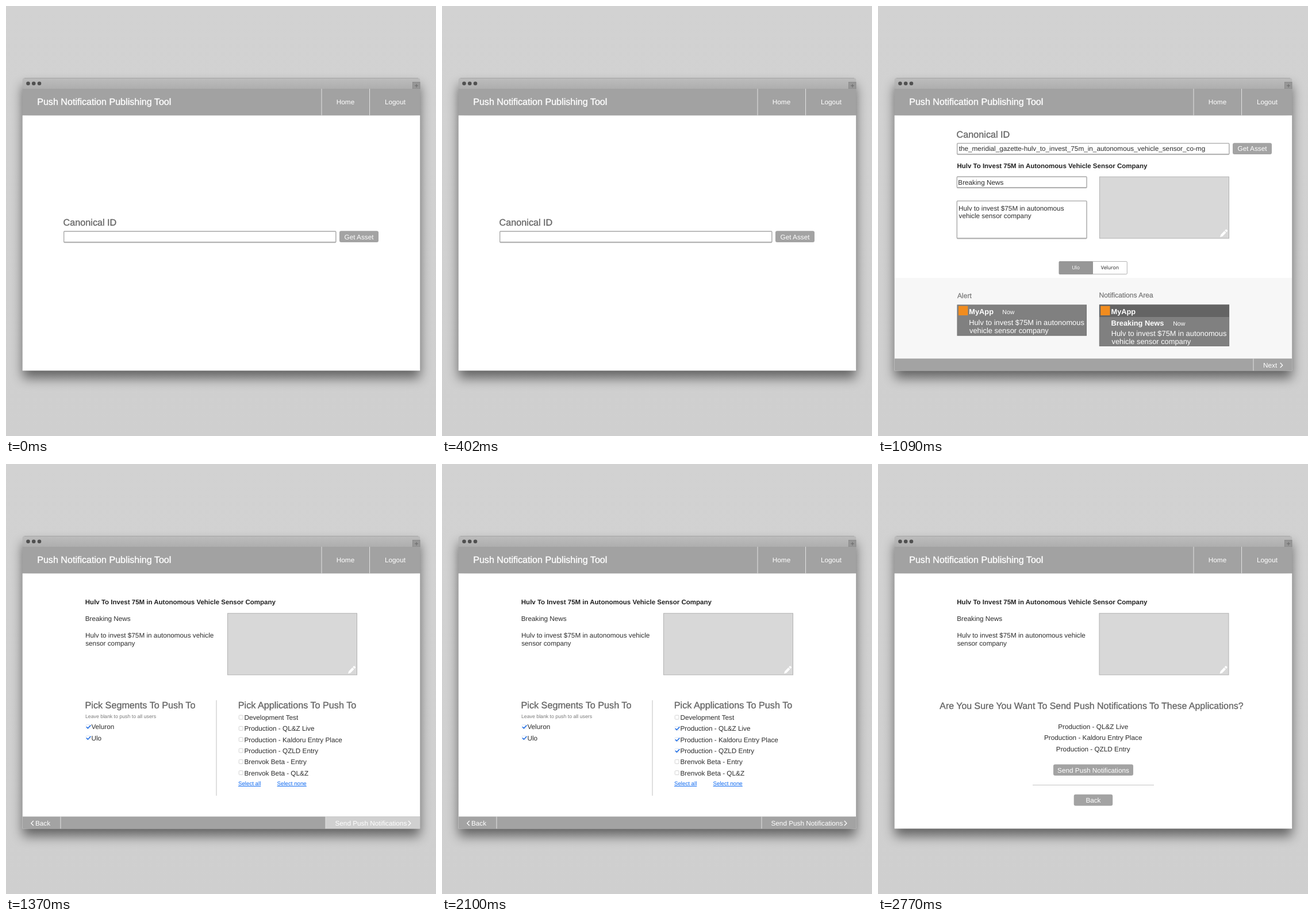
Animation of 748 by 748 pixels, one loop 3.44 s. Source, as an HTML page:

```html
<!DOCTYPE html>
<html lang="en">
<head>
<meta charset="utf-8">
<title>Push Notification Publishing Tool</title>
<style>
  html, body { margin: 0; height: 100%; overflow: hidden; background: #d0d0d0; }
  svg { display: block; width: 100vw; height: 100vh; }
  text { font: 11.75px "Liberation Sans", Arial, sans-serif; fill: #2c2c2c; text-rendering: geometricPrecision; white-space: pre; }
  .white { fill: #fff; }
  .title { font-size: 16.2px; fill: #666; stroke: #666; stroke-width: .35; }
  .brand { font-size: 16.1px; fill: #fff; stroke: #fff; stroke-width: .35; }
  .question { font-size: 15.95px; fill: #666; stroke: #666; stroke-width: .35; }
  .bold { font-weight: bold; font-size: 11.5px; fill: #222; }
  .label { font-size: 12.1px; fill: #777; stroke: #777; stroke-width: .25; }
  .alert { font-size: 12.85px; fill: #fff; }
  .strong { font-size: 12.8px; font-weight: bold; fill: #fff; }
  .now { font-size: 10.6px; fill: #fff; }
  .hint { font-size: 8.75px; fill: #777; }
  .link { font-size: 9.7px; fill: #0c68f0; text-decoration: underline; }
  .tab { font: 8.6px "Noto Sans", sans-serif; }
  .mid { text-anchor: middle; }
</style>
</head>
<body>
<svg id="stage" viewBox="0 0 748 748"></svg>
<script>
const GREY = '#a3a3a3';
const STARTS = [0, 670, 1370, 2100, 2770];
const LOOP = 3440;
const APPS = ['Development Test', 'Production - QL&amp;Z Live', 'Production - Kaldoru Entry Place',
  'Production - QZLD Entry', 'Brenvok Beta - Entry', 'Brenvok Beta - QL&amp;Z'];
const CHOSEN = APPS.slice(1, 4);

const text = (x, y, str, cls = '') => `<text x="${x}" y="${y}" class="${cls}">${str}</text>`;
const rect = (x, y, w, h, fill, more = '') =>
  `<rect x="${x}" y="${y}" width="${w}" height="${h}" fill="${fill}" ${more}/>`;
const path = (d, color, width = 1) =>
  `<path d="${d}" fill="none" stroke="${color}" stroke-width="${width}"/>`;

const field = (x, y, w, h) => rect(x + .7, y + 1.5, w - 1.4, h - 1.7, '#b8b8b8', 'rx="1" stroke="#c4c4c4"') +
  rect(x + .7, y + .7, w - 1.4, h - 2, '#fff', 'rx="1" stroke="#a6a6a6" stroke-width="1.3"');

const button = (x, y, w, label) => rect(x, y, w, 19.7, GREY, 'rx="3"') +
  text(x + w / 2, y + 14.2, label, 'white mid');

const search = (x, y, value) => text(x - .4, y - 9.3, 'Canonical ID', 'title') +
  field(x, y, 474.5, 20.7) + text(x + 3.7, y + 14, value) + button(x + 480, y, 68, 'Get Asset');

const preview = (x, y) => rect(x + .5, y + .5, 225, 107, '#d8d8d8', 'stroke="#b2b2b2"') +
  `<path transform="translate(${x + 210} ${y + 105.5}) rotate(-46)" fill="#fff"
    d="M0 0L4-2.1H13V2.1H4ZM14-2.1h2q1.4 0 1.4 1.4v1.4q0 1.4-1.4 1.4h-2z"/>`;

const article = x => text(x - .7, 244.4, 'Hulv To Invest 75M in Autonomous Vehicle Sensor Company', 'bold') +
  text(x - .8, 273.4, 'Breaking News') +
  text(x - .5, 302.4, 'Hulv to invest $75M in autonomous vehicle') +
  text(x - .3, 316, 'sensor company') + preview(x + 246.5, 259.3);

const message = (x, y) => text(x - .8, y, 'Hulv to invest $75M in autonomous', 'alert') +
  text(x, y + 14, 'vehicle sensor company', 'alert');

const appName = x => rect(x + 2, 521.8, 16.3, 16.3, '#f28c1e') + text(x + 20.3, 536.4, 'MyApp', 'strong');

const checkbox = (x, y, label, on) =>
  rect(x + .5, y - 7.9, 7, 7, '#fff', `rx="1.3" stroke="${on ? '#dfe6f2' : '#d2d2d2'}"`) +
  (on ? path(`M${x + 1.2} ${y - 4.2}l2.5 2.4 5-5.2`, '#1768e5', 1.5) : '') +
  text(x + 9.7, y, label);

const footer = rect(29, 613.3, 691, 21, GREY);
const chevron = (x, dir) => path(`M${x} 620.8l${4 * dir} 4.1 ${-4 * dir} 4.1`, '#fff', 1.3);
const rule = (x, y, h, color = '#e2e2e2') => path(`M${x} ${y}v${h}`, color);

const frame = `
  <defs>
    <linearGradient id="back" x2="0" y2="1"><stop stop-color="#d2d2d2"/><stop offset="1" stop-color="#cfcfcf"/></linearGradient>
    <linearGradient id="bar" x2="0" y2="1"><stop stop-color="#bdbdbd"/><stop offset="1" stop-color="#a5a5a5"/></linearGradient>
    <filter id="blur" x="-10%" y="-10%" width="120%" height="125%"><feGaussianBlur stdDeviation="10"/></filter>
  </defs>` +
  rect(0, 0, 748, 748, 'url(#back)') +
  rect(29, 138, 691, 509.3, '#000', 'opacity=".52" filter="url(#blur)"') +
  rect(28.7, 125.2, 691.5, 30, 'url(#bar)', 'rx="3"') +
  path('M32 125.6H717', '#9a9a9a', .7) +
  [38.5, 48.2, 58].map(x => `<circle cx="${x}" cy="134.7" r="3.3" fill="#505050"/>`).join('') +
  rect(707.5, 132.5, 12.5, 11.5, '#979797', 'stroke="#858585" stroke-width=".8"') +
  path('M711 138.7h6M714 135.7v6', '#666', .9) +
  rect(28.7, 144, 691.5, 46.3, '#a2a2a2') + rect(28.7, 190.3, 691.5, 444, '#fff') +
  rule(549, 144, 46.3) + rule(632.5, 144, 46.3) +
  text(54.2, 172.2, 'Push Notification Publishing Tool', 'brand') +
  text(590.5, 170.8, 'Home', 'white mid') + text(677, 170.8, 'Logout', 'white mid');

const compose = search(137, 238.2, 'the_meridial_gazette-hulv_to_invest_75m_in_autonomous_vehicle_sensor_co-mg') +
  text(137.4, 281.6, 'Hulv To Invest 75M in Autonomous Vehicle Sensor Company', 'bold') +
  field(136.7, 296.3, 227, 20.7) + text(139.3, 311, 'Breaking News') +
  field(136.7, 338.5, 227, 66.7) +
  text(140, 355.5, 'Hulv to invest $75M in autonomous') + text(140.5, 369.1, 'vehicle sensor company') +
  preview(385, 296.6) +
  rect(315, 444.4, 118.3, 22, '#fff', 'rx="1.5" stroke="#b0b0b0"') +
  rect(314.8, 444, 59.2, 22.8, '#979797', 'rx="1.5"') +
  text(344, 458.3, 'Ulo', 'tab white mid') + text(403.4, 458.3, 'Veluron', 'tab mid') +
  rect(29, 473, 691, 141, '#f7f7f7') +
  text(138, 507.6, 'Alert', 'label') + text(384.6, 507.2, 'Notifications Area', 'label') +
  rect(138, 520, 224.5, 53.2, '#808080', 'stroke="#747474"') +
  appName(138) + text(216.3, 536.2, 'Now', 'now') + message(159, 555.2) +
  rect(385.3, 520, 225.3, 71.4, '#808080', 'stroke="#747474"') + rect(385, 519.5, 226, 21.5, '#646464') +
  appName(385.2) + text(405.6, 556.1, 'Breaking News', 'strong') +
  text(513.2, 556, 'Now', 'now') + message(406.5, 573.6) +
  footer + rule(653, 613.3, 21) + text(670, 629, 'Next', 'white') + chevron(699.7, 1);

const pick = ready => article(138.5) +
  text(137.5, 424.5, 'Pick Segments To Push To', 'title') +
  text(138, 442, 'Leave blank to push to all users', 'hint') +
  checkbox(138.7, 461.4, 'Veluron', true) + checkbox(138.7, 480.7, 'Ulo', true) +
  rule(366, 411, 166, '#c0c0c0') +
  text(403.8, 424.5, 'Pick Applications To Push To', 'title') +
  APPS.map((app, i) => checkbox(404.7, 445 + i * 19.3, app, ready && CHOSEN.includes(app))).join('') +
  text(404, 559, 'Select all', 'link') + text(471.6, 559, 'Select none', 'link') +
  footer + rule(95, 613.3, 21) + chevron(47.8, -1) + text(51, 629.3, 'Back', 'white') +
  (ready ? '' : rect(556, 613.3, 164, 21, '#d0d0d0')) + rule(556, 613.3, 21) +
  text(572.5, 629, 'Send Push Notifications', 'white') + chevron(699.9, 1);

const confirm = article(138) +
  text(371.5, 425.8, 'Are You Sure You Want To Send Push Notifications To These Applications?', 'question mid') +
  CHOSEN.map((app, i) => text(374.2, 461 + i * 19.3, app, 'mid')).join('') +
  button(305, 522.4, 139, 'Send Push Notifications') +
  path('M269 558.5H480', '#c4c4c4', 1.2) + button(340.7, 574.8, 67.5, 'Back');

const scenes = [search(100, 391.3, ''), compose, pick(false), pick(true), confirm];
const stage = document.getElementById('stage');
stage.innerHTML = frame + scenes.map(s => `<g class="scene" display="none">${s}</g>`).join('');
const groups = stage.querySelectorAll('.scene');

function draw() {
  const t = performance.now() % LOOP;
  const current = STARTS.filter(start => start <= t).length - 1;
  groups.forEach((g, i) => g.setAttribute('display', i === current ? 'inline' : 'none'));
  requestAnimationFrame(draw);
}
draw();
</script>
</body>
</html>
```
